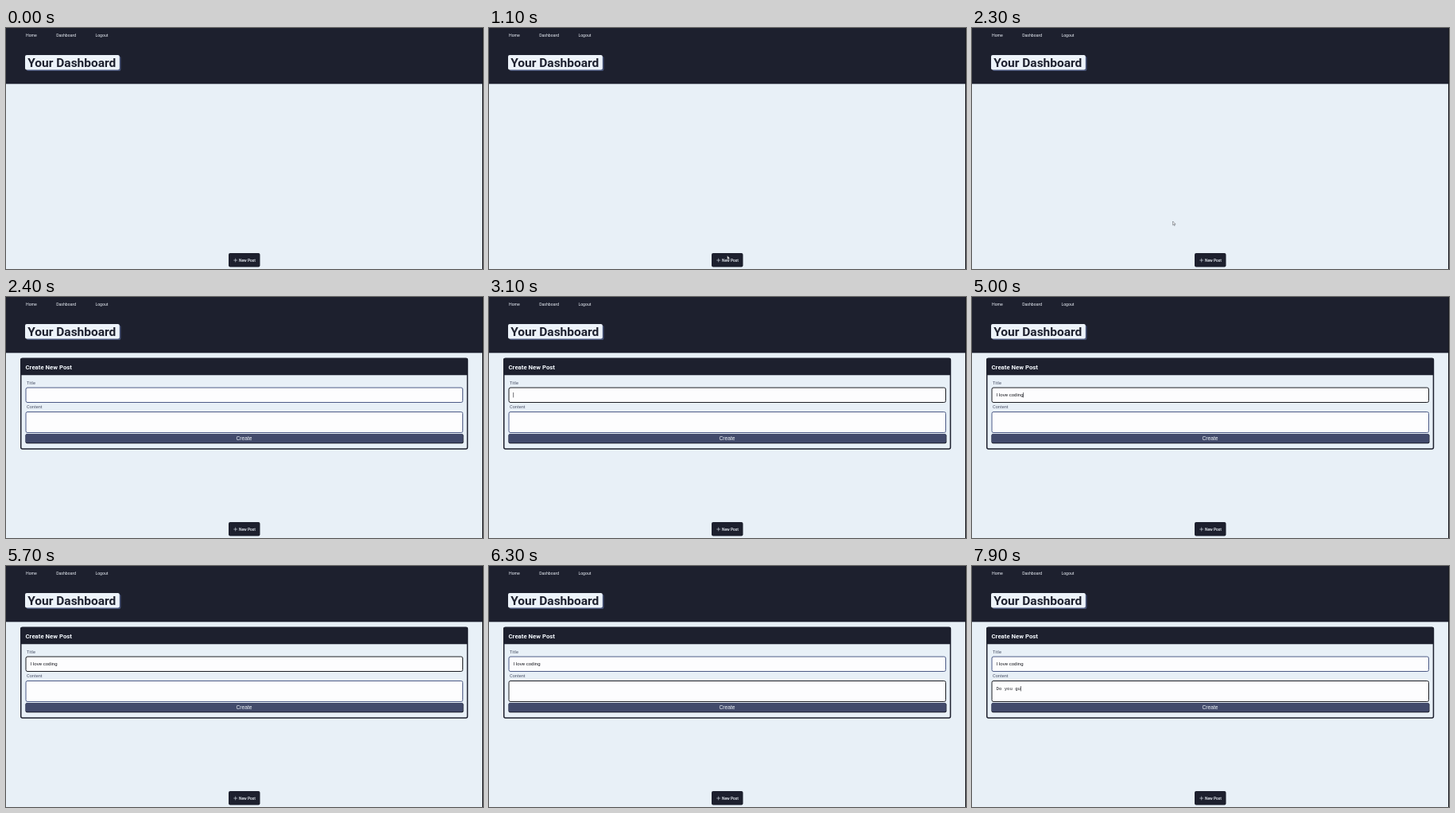
An HTML page that plays this animation: 600 px wide and 303 px high, repeating every 8000 ms.

```html
<!DOCTYPE html>
<html lang="en">
<head>
<meta charset="utf-8">
<title>Dashboard</title>
<style>
  html, body { margin: 0; width: 100%; height: 100%; overflow: hidden; background: #e8f0f7; }
  svg { display: block; width: 600px; height: 303px; }
  text { font-family: Roboto, "Open Sans", sans-serif; white-space: pre; }
  .nav { font-size: 5.15px; fill: #eef3fa; }
  .label { font-size: 5.6px; fill: #4b5268; }
  .ui { font-family: "Liberation Sans", sans-serif; }
  .mono { font-family: "Liberation Mono", monospace; }
  .field { fill: #fdfdfe; stroke-width: 1; }
</style>
</head>
<body>
<svg viewBox="0 0 600 303">
  <rect width="600" height="303" fill="#e8f0f7"/>
  <rect width="600" height="70.3" fill="#1d202e"/>
  <g class="nav">
    <text x="25" y="10.7">Home</text>
    <text x="63.2" y="10.7">Dashboard</text>
    <text x="112.4" y="10.7">Logout</text>
  </g>
  <rect x="25.8" y="35.6" width="118.6" height="18.4" rx="2" fill="#485478"/>
  <rect x="24" y="34" width="118.8" height="18.5" rx="2" fill="#edf3fa"/>
  <text x="27.2" y="48.8" font-size="15.5" font-weight="700" fill="#1d202e">Your Dashboard</text>

  <g id="form">
    <rect x="18.75" y="77.3" width="561.7" height="113.7" rx="2" fill="#e8f0f7" stroke="#1d202e" stroke-width="1.5"/>
    <path d="M18 98.2V79a2 2 0 0 1 2-2H579a2 2 0 0 1 2 2V98.2Z" fill="#1d202e"/>
    <text x="24.5" y="90.6" font-size="7.8" font-weight="700" fill="#f3f7fc">Create New Post</text>
    <text class="label" x="26" y="109.7">Title</text>
    <rect class="field" id="titleBox" x="25" y="114" width="549.5" height="18.5" rx="2"/>
    <text class="ui" id="titleText" x="30.6" y="125.3" font-size="6.05" fill="#15161c"></text>
    <text class="label" x="26" y="140.4">Content</text>
    <rect class="field" id="contentBox" x="25" y="144.5" width="549.5" height="26" rx="2"/>
    <text class="mono" id="contentText" x="30.5" y="156.2" font-size="5.65" fill="#15161c"></text>
    <rect x="24.5" y="172.3" width="551" height="11.9" rx="2" fill="#1d202e"/>
    <rect x="24.5" y="172" width="550.3" height="11.2" rx="2" fill="#424a6b"/>
    <text class="ui" x="299.5" y="180" font-size="6.65" text-anchor="middle" fill="#f3f7fc">Create</text>
    <rect id="caret" width=".6" height="6.4" fill="#15161c"/>
  </g>

  <rect x="280" y="283" width="39.5" height="17.5" rx="2" fill="#1d202e"/>
  <path d="M286.3 292H291M288.65 289.65V294.35" stroke="#dfe6f0" stroke-width=".6"/>
  <text x="293" y="293.8" font-size="4.9" font-weight="500" fill="#eef3fa">New Post</text>
  <path id="pointer" d="M0 0V4.8L1.1 3.8L1.9 5.6L2.7 5.2L1.9 3.5H3.4Z" fill="#fff" stroke="#33363f" stroke-width=".45"/>
  <rect x="599" width="1" height="303" fill="#17181f"/>
</svg>
<script>
const LOOP = 8000;
const FORM_OPEN = 2400, TITLE_FOCUS = 2900, CONTENT_FOCUS = 5800, BLINK = 500;
const $ = id => document.getElementById(id);

const title = {
  box: $('titleBox'), text: $('titleText'), value: 'I love coding', caretY: 120,
  // [time, characters typed]
  keys: [[3700, 1], [3900, 2], [4000, 3], [4100, 4], [4200, 5], [4300, 6],
         [4500, 8], [4600, 9], [4700, 10], [4800, 11], [4900, 12], [5000, 13]]
};
const content = {
  box: $('contentBox'), text: $('contentText'), value: 'Do you gu', caretY: 151,
  keys: [6700, 6900, 7000, 7100, 7300, 7500, 7600, 7800, 7900].map((t, i) => [t, i + 1])
};

// [time, x, y]
const pointerPath = [[200, 478, 170], [1000, 300, 286], [1900, 292, 290], [2100, 290, 289], [2300, 252.6, 243]];

const ease = p => p * p * (3 - 2 * p);

function pointerAt(t) {
  const i = pointerPath.findIndex(p => p[0] > t);
  if (i < 0) return pointerPath.at(-1).slice(1);
  const [t0, x0, y0] = pointerPath[i - 1], [t1, x1, y1] = pointerPath[i];
  const p = ease((t - t0) / (t1 - t0));
  return [x0 + (x1 - x0) * p, y0 + (y1 - y0) * p];
}

function drawField(field, t, focused) {
  const typed = field.keys.filter(k => k[0] <= t).at(-1);
  field.text.textContent = field.value.slice(0, typed ? typed[1] : 0);
  field.box.setAttribute('stroke', focused ? '#1d1e24' : '#4d5b86');
}

function drawCaret(field, t, focusTime) {
  const lastKey = field.keys.filter(k => k[0] <= t).at(-1);
  const since = t - (lastKey ? lastKey[0] : focusTime);
  const width = field.text.textContent ? field.text.getComputedTextLength() : 0;
  const caret = $('caret');
  caret.setAttribute('x', 30.5 + width);
  caret.setAttribute('y', field.caretY);
  caret.style.display = since >= 0 && Math.floor(since / BLINK) % 2 === 0 ? '' : 'none';
}

function render(t) {
  const open = t >= FORM_OPEN;
  const inContent = t >= CONTENT_FOCUS;
  $('form').style.display = open ? '' : 'none';
  if (open) {
    drawField(title, t, t >= TITLE_FOCUS && !inContent);
    drawField(content, t, inContent);
    if (inContent) drawCaret(content, t, CONTENT_FOCUS);
    else drawCaret(title, t, TITLE_FOCUS);
  }
  const moving = t >= pointerPath[0][0] && !open;
  $('pointer').style.display = moving ? '' : 'none';
  if (moving) $('pointer').setAttribute('transform', `translate(${pointerAt(t)})`);
}

const start = performance.now();
function tick() {
  render((performance.now() - start) % LOOP);
  requestAnimationFrame(tick);
}
tick();
</script>
</body>
</html>
```
